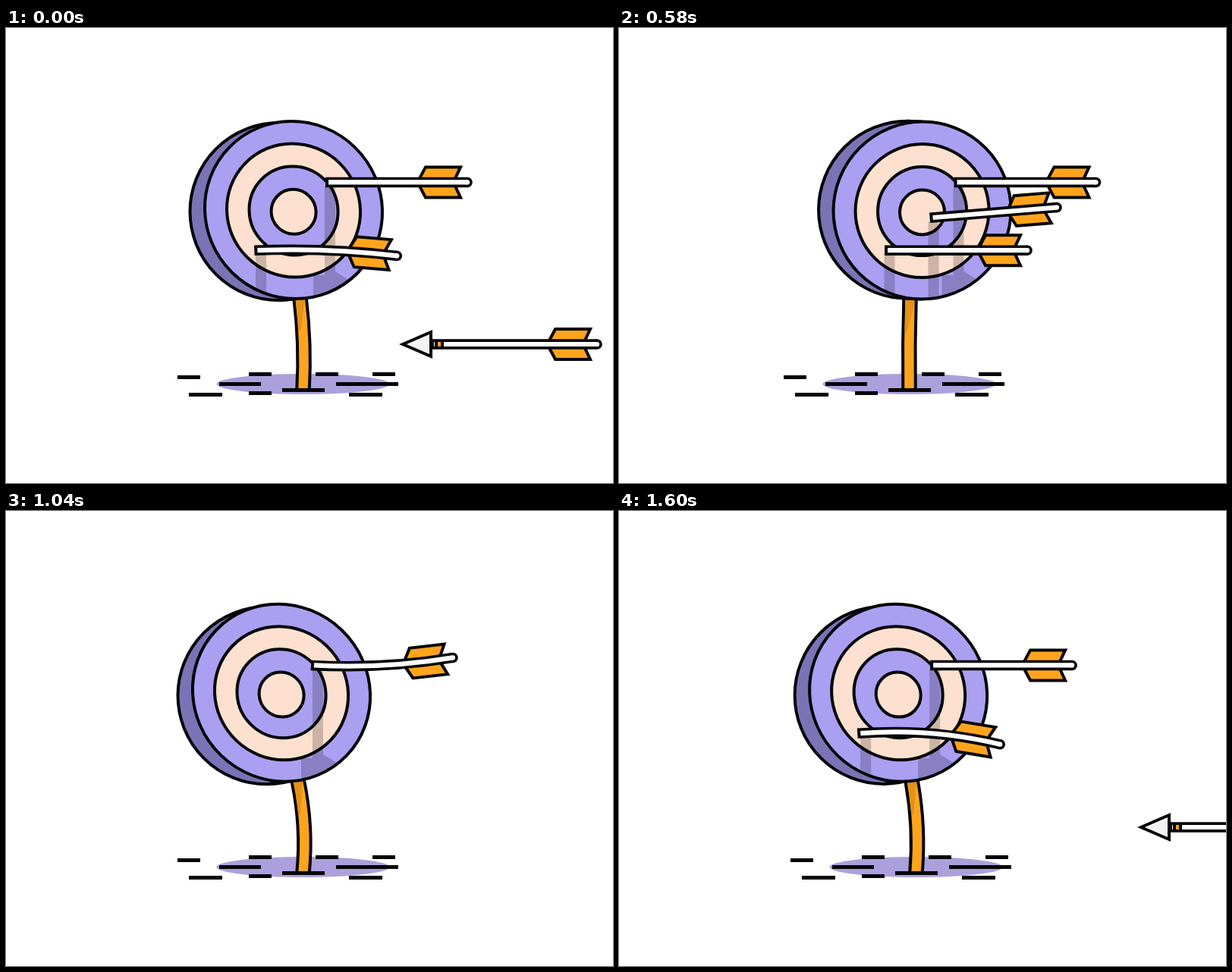
Write an HTML page with a canvas that moves like this. It is 800 px wide and 600 px high and loops after 1.62 s.

```html
<!DOCTYPE html>
<html lang="en">
<head>
<meta charset="utf-8">
<title>Target practice</title>
<style>
html, body { margin: 0; width: 100%; height: 100%; overflow: hidden; background: #fff; }
canvas { display: block; width: 800px; height: 600px; }
</style>
</head>
<body>
<canvas id="stage" width="800" height="600"></canvas>
<script>
const c = document.getElementById('stage').getContext('2d');
const LOOP = 1620, STEP = 20, START = 653;   // START: point of the cycle shown at load
const SPEED = 8.25;
const TRAVEL = 800, LEAVE = [1199, 1744], ENTER = [1082, 1620];
const INK = '#050508', LILAC = '#ab9ff2', PEACH = '#fde0cf', ORANGE = '#ffa41c';

// Sway of the board and quiver of a shaft, by ms since a hit
const SWAY = [[0, 0], [20, -39.5], [40, -27], [100, 6], [130, 9], [220, -15.5],
              [260, -11], [280, -4.5], [335, 0]];
const QUIVER = [[0, 0], [20, 1], [40, .5], [100, -.15], [220, .22], [260, 0]];

// Tail position relative to the board centre
const SHOTS = [
  { at: 53,   x: 236,   y: 203.4, angle: 0,     len: 194, bend: -10, sway: 1 },
  { at: 613,  x: 145.5, y: 293.2, angle: 0,     len: 195, bend: 14.5, sway: .87 },
  { at: 1133, x: 184.5, y: 236,   angle: -.082, len: 175, bend: 0,   sway: 1 }
];
const MISSES = [
  { at: 313, x: 527, y: 26,  angle: -.388 },
  { at: 633, x: 951, y: 417, angle: 0 },
  { at: 833, x: 951, y: 77,  angle: 0 }
];
// Ground dashes: left, right, y
const DASHES = [[226, 256, 460.5], [320, 350, 456.5], [408, 438, 456.5], [483, 513, 456.5],
  [281, 336, 469.5], [435, 517, 469.5], [364, 420, 477.5], [241, 285, 483.5],
  [320, 350, 481.5], [452, 496, 483.5]];

const smooth = k => k * k * (3 - 2 * k);
const ease = (t, [a, b]) => smooth(Math.min(1, Math.max(0, (t - a) / (b - a))));

function sample(keys, t) {
  for (let i = 1; i < keys.length; i++) {
    const [t0, v0] = keys[i - 1], [t1, v1] = keys[i];
    if (t < t1) return v0 + (v1 - v0) * ease(t, [t0, t1]);
  }
  return keys[keys.length - 1][1];
}

function outline(fill, width = 4) {
  if (fill) { c.fillStyle = fill; c.fill(); }
  c.strokeStyle = INK;
  c.lineWidth = width;
  c.stroke();
}

function poly(...pts) {
  c.beginPath();
  pts.forEach(([x, y]) => c.lineTo(x, y));
  c.closePath();
}

function disc(x, y, r) {
  c.beginPath();
  c.arc(x, y, r, 0, Math.PI * 2);
}

function shaft(len, bend, inset, color, width) {
  c.beginPath();
  c.moveTo(-len + inset, 0);
  c.quadraticCurveTo(-len / 2, -bend / 2, -7, bend);
  c.strokeStyle = c.fillStyle = color;
  c.lineWidth = width;
  c.stroke();
  disc(-7, bend, width / 2);
  c.fill();
}

function arrow(x, y, angle, len, bend, head) {
  c.save();
  c.translate(x, y);
  c.rotate(angle);

  // Feathers ride on the shaft's curve
  const k = (len - 43) / (len - 7);
  c.save();
  c.translate(-43, bend * (2 * k * k - k));
  c.rotate(Math.atan(bend * (4 * k - 1) / len));
  poly([-27, -5], [-19, -20], [27, -20], [20, -5], [20, 5], [27, 20], [-19, 20], [-27, 5]);
  outline(ORANGE);
  c.restore();

  shaft(len, bend, 0, INK, 13.5);
  shaft(len, bend, 4, '#fff', 6.2);
  if (head) {
    c.fillStyle = INK;
    c.fillRect(-221, -6, 12, 12);
    c.fillStyle = ORANGE;
    c.fillRect(-217, -3, 4, 6);
    poly([-263, 0], [-226, -16], [-226, 16]);
    outline('#f3f3f3');
  }
  c.restore();
}

function fly(x, y, angle, wait) {
  const d = SPEED * wait;
  arrow(x + d * Math.cos(angle), y + d * Math.sin(angle), angle, 226, 0, true);
}

function ground() {
  c.fillStyle = '#aca0dc';
  c.beginPath();
  c.ellipse(391.5, 469.5, 114, 13.5, 0, 0, Math.PI * 2);
  c.fill();
}

function dashes() {
  c.fillStyle = INK;
  DASHES.forEach(([l, r, y]) => c.fillRect(l, y - 2.5, r - l, 5));
}

function post(dx) {
  const top = 391.5 + dx * .165, mid = 391.5 - dx * .15;
  const path = () => {
    c.beginPath();
    c.moveTo(391.5, 477);
    c.quadraticCurveTo(mid, 417, top, 357);
    c.lineTo(top + dx * .02, 350);
  };
  path();
  outline(null, 20.5);
  path();
  c.strokeStyle = ORANGE;
  c.lineWidth = 12.5;
  c.stroke();
  const low = top - dx * .16;
  poly([top - 6, 352], [top + 6, 352], [top + 5, 368], [low - 3, 400], [low - 6, 400]);
  c.fillStyle = '#e39119';
  c.fill();
}

function board(cx, dx, hits) {
  const cy = 240.5 + dx * .02, back = 240.2 - dx * .08;
  disc(cx - 19.5, back, 117);
  outline('#7b73b5');
  c.beginPath();
  for (const r of [-117, 117]) {
    c.moveTo(cx - 19.5, back + r);
    c.lineTo(cx, cy + r);
  }
  outline(null);

  c.save();
  c.transform(1, 0, -dx * .001, 1, cx, cy);
  disc(0, 0, 117);    outline(LILAC);
  disc(0, .5, 88);    outline(PEACH);
  disc(0, 1, 58.5);   outline(LILAC);
  disc(0, 2.3, 29.5); outline(PEACH);
  disc(0, 0, 115);
  c.restore();

  // Shadows the shafts cast on the face
  c.save();
  c.clip();
  c.fillStyle = 'rgba(0,0,0,.2)';
  if (hits > 0) {
    const x = cx + 41;
    poly([x, 209], [x + 14, 209], [x + 14, 321], [x + 30, 331], [x + 30, 360],
         [x - 15, 360], [x - 15, 326], [x, 326]);
    c.fill();
  }
  if (hits > 1) c.fillRect(cx - 50, 299, 14, 65);
  if (hits > 2) c.fillRect(cx + 8, 255, 14, 105);
  c.restore();
}

function target(offset, u, shots) {
  const landed = shots.filter(s => u >= s.at);
  const last = landed[landed.length - 1];
  const dx = last ? last.sway * sample(SWAY, u - last.at) : 0;
  const cx = 402.5 + dx;
  c.save();
  c.translate(offset, 0);
  ground();
  post(dx);
  dashes();
  board(cx, dx, landed.length);
  shots.forEach(s => {
    const age = u - s.at;
    if (age >= 0) {
      const bend = s.bend * sample(QUIVER, age);
      arrow(cx + s.x - Math.abs(bend) * .3, s.y, s.angle, s.len, bend, false);
    } else if (age > -45) {
      fly(402.5 + s.x, s.y, s.angle, -age);
    }
  });
  c.restore();
}

function draw(t) {
  const u = (t + START) % LOOP;
  c.fillStyle = '#fff';
  c.fillRect(0, 0, 800, 600);
  target(-TRAVEL * ease(u, LEAVE), u, SHOTS);
  target(TRAVEL * (1 - ease(u, ENTER)), 0, []);
  MISSES.forEach(m => {
    if (Math.abs(u - m.at) < 130) fly(m.x, m.y, m.angle, m.at - u);
  });
}

const begin = performance.now();
function tick() {
  const t = (performance.now() - begin) % LOOP;
  draw(Math.floor(t / STEP) * STEP);
  requestAnimationFrame(tick);
}
tick();
</script>
</body>
</html>
```
